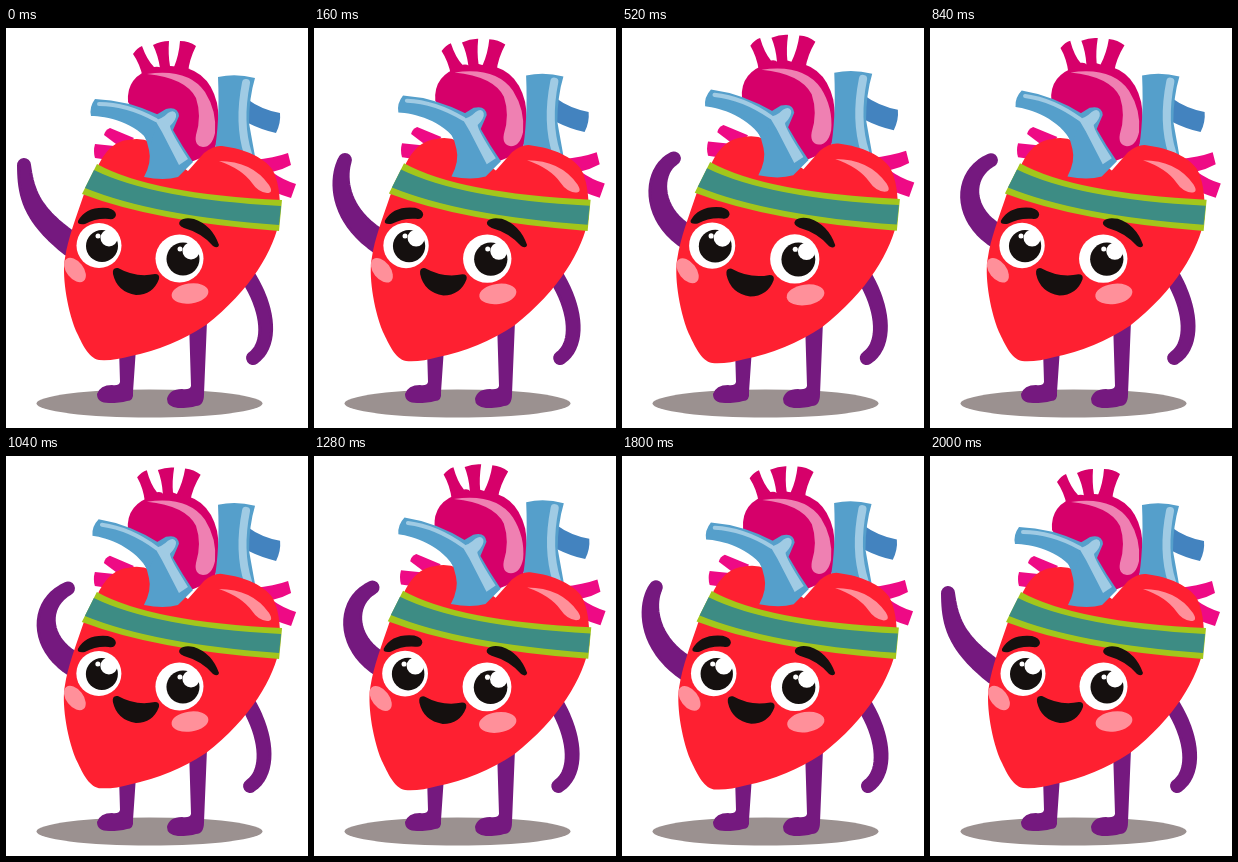
Recreate the animation shown at these times as an HTML page. Size 302 px wide and 400 px high, loop 2040 ms.

```html
<!DOCTYPE html>
<html lang="en">
<head>
<meta charset="utf-8">
<title>Waving heart</title>
<style>
  html, body { margin: 0; width: 100%; height: 100%; overflow: hidden; background: #fff; }
  svg { display: block; width: 100%; height: 100%; }
  .limb { fill: #75197f; stroke: #75197f; stroke-width: 3; stroke-linejoin: round; }
  .leg { fill: #75197f; }
  .blue { fill: #559fcb; }
  .light { fill: #a0cbe4; }
  .shine { fill: none; stroke: #a0cbe4; stroke-linecap: round; }
  .pink { fill: #ee0a85; }
  .arch { fill: #d6006a; }
  .ink { fill: #15100f; }
  .white { fill: #fff; }
  .blush { fill: #ff909a; }
</style>
</head>
<body>
<svg viewBox="0 0 302 400">
  <ellipse cx="143.500" cy="375.500" rx="113" ry="14" fill="#9b9190"/>
  <path class="leg" d="M113 320H130L127 364Q128 373 121 373Q114 375 103 375Q91 375 91 366Q94 357 106 357Q113 358 114 354Z"/>
  <path class="leg" d="M183 293H201L198 366Q198 378 190 378Q184 380 172 380Q161 379 161 371Q163 361 176 361Q184 362 185 358Z"/>
  <path id="rest" class="limb"/>
  <path id="wave" class="limb"/>

  <g id="body">
    <path class="pink" d="M98 107Q99 102 104 100L128 110L118 122Z"/>
    <path class="pink" d="M89 116Q87 123 89 130L110 133L118 119Z"/>
    <path class="pink" d="M248 132Q268 130 282 125L285 137Q276 142 266 144Q277 152 290 156L285 170Q268 165 252 156Z"/>

    <path id="stubs" class="arch" d="M127 26Q131 20 136 18Q141 32 148 39Q153 38 154 40Q152 27 147 17Q155 13 163 13Q162 27 164 38L168 39Q173 27 174 13Q183 13 190 18Q183 32 182 45L165 60L137 50Q134 36 127 26Z"/>
    <path class="arch" d="M122 74Q120 48 148 40Q200 30 211 75Q216 105 207 125L180 136L140 100Z"/>
    <path fill="#ef80b2" d="M141 46Q182 40 199 64Q211 83 209 105Q206 119 197 119Q188 118 190 107Q196 88 190 70Q180 50 141 46Z"/>

    <path fill="#4383bf" d="M241 71Q256 82 274 85Q275 95 270 105Q256 102 242 95Z"/>
    <path class="blue" d="M212 49Q230 45 249 50Q243 70 243 95L250 134L208 126Q214 95 212 49Z"/>
    <path class="shine" stroke-width="8" d="M240 55Q232 95 242 126"/>

    <path fill="#fe2031" d="M92 138C98 125 108 113 122 112Q134 109 145 114L175 138L182 143L198 125Q208 117 216 118C240 121 258 130 266 141Q275 156 274 190C268 222 245 262 200 297Q165 320 125 328Q108 333 93 332C82 330 76 315 70 303C60 278 56 245 59 230C62 210 70 190 78 166Z"/>
    <path class="blush" d="M213 133Q246 133 263 157Q268 165 261 165Q252 164 246 155Q236 141 213 133Z"/>

    <path class="blue" d="M128 88L150 87L160 81Q172 78 173 88L167 102Q176 118 187 134L172 149Q158 153 138 149Q146 134 143 122Q140 105 128 96Z"/>
    <g id="vessel">
      <path class="blue" d="M89 71Q121 72 153 87L145 116C130 94 100 88 85 88Q83 79 89 71Z"/>
      <path class="shine" stroke-width="4" d="M93 76Q121 76 150 92"/>
    </g>
    <path class="light" d="M149 92Q156 91 162 85Q168 81 170 86Q171 91 164 98Q164 103 182 131L173 137L156 104Z"/>

    <path fill="#a3c61b" d="M91 136Q145 166 276 172L273 203Q150 194 76 166Z"/>
    <path fill="#3d8c84" d="M88 142Q147 171 275 178L273 197Q148 188 79 160Z"/>

    <circle class="white" cx="93" cy="217.500" r="22.500"/>
    <circle class="white" cx="173.500" cy="230.500" r="24"/>
    <circle class="ink" cx="96" cy="218" r="16"/>
    <circle class="ink" cx="177" cy="231" r="16.500"/>
    <circle class="white" cx="103" cy="210" r="8.500"/>
    <circle class="white" cx="185" cy="223" r="8.500"/>
    <circle class="white" cx="92" cy="208" r="2.500"/>
    <circle class="white" cx="174" cy="221" r="2.500"/>

    <path class="ink" d="M72 193Q80 178 102 180Q110 182 110 187Q109 192 103 191Q90 190 79 196Q71 197 72 193Z"/>
    <path class="ink" d="M174 193Q178 189 188 191Q206 197 213 217Q212 221 207 218Q196 205 178 200Q171 197 174 193Z"/>
    <path class="ink" d="M112 240Q130 250 149 246Q154 246 153 251Q147 267 130 267Q111 264 107 246Q106 239 112 240Z"/>
    <ellipse class="blush" cx="69" cy="242" rx="8.500" ry="14" transform="rotate(-38 69 242)"/>
    <ellipse class="blush" cx="184" cy="265.500" rx="18.500" ry="10" transform="rotate(-8 184 265.500)"/>
  </g>
</svg>
<script>
  const LOOP = 2040, STEP = 40, SWING = 2000, SLICES = 20;
  const part = id => document.getElementById(id);
  const [body, stubs, vessel, rest, wave] =
    ['body', 'stubs', 'vessel', 'rest', 'wave'].map(part);
  const move = (el, value) => el.setAttribute('transform', value);
  const curve = (start, a, b, w) => start + a * w + b * w * w;

  const bezier = (a, b, c, d, s) => {
    const r = 1 - s;
    return r * r * r * a + 3 * r * r * s * b + 3 * r * s * s * c + s * s * s * d;
  };

  // Outline of a limb along a cubic curve, widening from tip to root.
  function limb(el, points, tip, root) {
    const at = s => [0, 1].map(axis => bezier(...points.map(p => p[axis]), s));
    const near = [], far = [];
    for (let i = 0; i <= SLICES; i++) {
      const s = i / SLICES, [x, y] = at(s);
      const [x0, y0] = at(s - 0.01), [x1, y1] = at(s + 0.01);
      const k = (tip + (root - tip) * s) / Math.hypot(x1 - x0, y1 - y0);
      const nx = (y1 - y0) * k, ny = (x0 - x1) * k;
      near.push([x + nx, y + ny]);
      far.unshift([x - nx, y - ny]);
    }
    const end = `A${tip} ${tip} 0 0 1 ${near[0]}`;
    el.setAttribute('d', `M${near.join('L')}L${far.join('L')}${end}Z`);
  }

  const waveArm = w => [
    [18 + 44 * w, curve(137, -22, 17.5, w)],
    [20 + 11 * w, curve(165, -65, 48, w)],
    [curve(25, -9, 17, w), 187 + 2 * w],
    [66 + 3 * w, 217 - 8 * w]
  ];

  function draw(now) {
    const t = Math.floor(now % LOOP / STEP) * STEP;
    const u = t / SWING;
    const w = 4 * u * (1 - u);
    // The body swells twice for each wave of the arm.
    const beat = Math.abs(Math.sin(2 * Math.PI * u)) ** 1.5;

    limb(wave, waveArm(w), 5.5, 11);
    move(body, `translate(202 212) scale(${1 + 0.026 * beat}) translate(-202 -212)`);
    move(stubs, `rotate(${5 * w} 180 72)`);
    move(vessel, `rotate(${7.5 * w} 148 96)`);
    move(rest, `rotate(${2.5 * w} 245 262)`);
    requestAnimationFrame(tick);
  }

  limb(rest, [[247, 330], [268, 315], [262, 275], [236, 240]], 5.5, 6.5);
  const begin = performance.now();
  const tick = () => draw(performance.now() - begin);
  tick();
</script>
</body>
</html>
```
